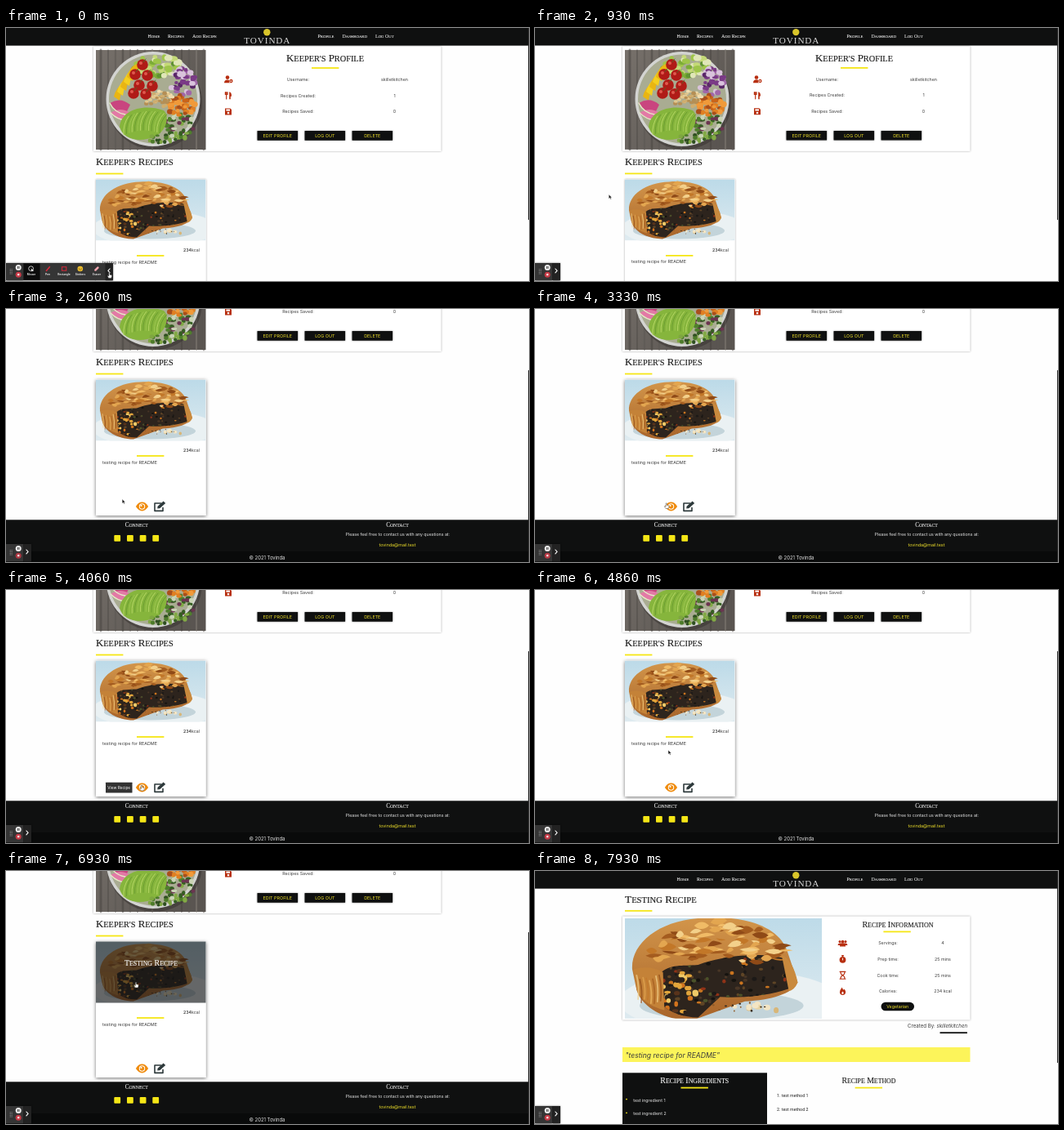
An HTML page for the animation above (8 s loop, 640 by 310 pixels).

```html
<!DOCTYPE html>
<html lang="en">
<head>
<meta charset="utf-8">
<title>Recipe profile</title>
<style>
html, body { margin: 0; width: 100%; height: 100%; overflow: hidden; background: #fefefe; }
svg { display: block; width: 640px; height: 310px; }
text { font-family: Inter, "Open Sans", sans-serif; fill: #3c3c3c; }
.cap { font-family: "Liberation Serif", "Noto Serif", serif; stroke-width: .012em; }
.card { fill: #fff; filter: drop-shadow(0 .7px .8px rgba(0,0,0,.36)); }
.btn { filter: drop-shadow(0 .6px .8px rgba(0,0,0,.4)); }
</style>
</head>
<body>
<svg id="stage" viewBox="0 0 640 310"></svg>
<script>
const INK = '#0f1010', YELLOW = '#f5e616', RUST = '#b72f10';
const USER = 'skilletkitchen', OWNER = "Keeper's", BRAND = 'Tovinda';

// ---- drawing helpers ----
const rect = (x, y, w, h, fill, more = '') =>
  `<rect x="${x}" y="${y}" width="${w}" height="${h}" fill="${fill}" ${more}/>`;
const oval = (x, y, rx, ry, fill, more = '') =>
  `<ellipse cx="${x}" cy="${y}" rx="${rx}" ry="${ry}" fill="${fill}" ${more}/>`;
const dot = (x, y, r, fill, more = '') => oval(x, y, r, r, fill, more);
const path = (d, fill, more = '') => `<path d="${d}" fill="${fill}" ${more}/>`;
const line = (d, color, w, more = '') =>
  path(d, 'none', `stroke="${color}" stroke-width="${w}" stroke-linecap="round" stroke-linejoin="round" ${more}`);
const group = (body, more = '') => `<g ${more}>${body}</g>`;
const at = (x, y, body, scale = 1) => group(body, `transform="translate(${x} ${y}) scale(${scale})"`);
const text = (x, y, size, str, anchor = 'start', more = '') =>
  `<text x="${x}" y="${y}" font-size="${size}" text-anchor="${anchor}" ${more}>${str}</text>`;
const mid = (x, y, str, size = 5.35, more = '') => text(x, y, size, str, 'middle', more);
const fillOf = c => `style="fill:${c}"`;

function caps(x, y, size, str, color = '#1c1c1c', anchor = 'start') {
  const spans = str.split(' ').map(w =>
    `<tspan font-size="${size}">${w[0].toUpperCase()}</tspan>` +
    `<tspan font-size="${size * .8}">${w.slice(1).toUpperCase()}</tspan>`).join(' ');
  return `<text class="cap" x="${x}" y="${y}" font-size="${size}" text-anchor="${anchor}" style="fill:${color};stroke:${color}">${spans}</text>`;
}
const rule = (x, y, color = YELLOW) => rect(x, y + .1, 33.4, 1.8, color);

let seed = 7;
const rnd = () => (seed = (seed * 16807) % 2147483647) / 2147483647;
const pick = list => list[Math.floor(rnd() * list.length)];
function scatter(n, cx, cy, rx, ry, size, colors) {
  let out = '';
  for (let i = 0; i < n; i++) {
    const a = rnd() * 6.283, d = Math.sqrt(rnd());
    out += oval((cx + Math.cos(a) * d * rx).toFixed(1), (cy + Math.sin(a) * d * ry).toFixed(1),
      (size * (.7 + rnd() * .6)).toFixed(1), (size * (.6 + rnd() * .5)).toFixed(1), pick(colors));
  }
  return out;
}

// ---- pictures ----
function bowl() {
  let s = rect(110, 27, 134.5, 122, 'url(#board)');
  for (let x = 116; x < 244; x += 9)
    s += line(`M${x} 27V149`, pick(['#45413e', '#86807a', '#5a5551']), 1 + rnd() * 2, 'opacity=".5"');
  s += dot(182, 91, 58, '#2f2b29', 'opacity=".45"') + oval(180, 87, 57.5, 58, '#d3d4d1') + oval(180, 87, 54, 54.5, '#a9ac92');
  s += scatter(46, 186, 48, 30, 13, 4, ['#9fc54a', '#7bab37', '#c4d977', '#5f9132', '#e0e6b8']);
  s += scatter(44, 216, 66, 16, 17, 3.2, ['#7a3a86', '#a067a8', '#5a2768', '#d9c3dc']);
  s += scatter(44, 212, 121, 19, 16, 3, ['#4f7f2c', '#355f22', '#82aa45', '#6b3550', '#c9d3b4']);
  s += scatter(40, 214, 96, 18, 13, 3.4, ['#e07f22', '#c9641a', '#f09a3a', '#a94f1c']);
  s += scatter(48, 187, 87, 18, 11, 2.3, ['#e3c78d', '#cfad6e', '#f0dcae', '#b58f55']);
  for (let i = 0; i < 5; i++)
    s += path(`M${132 + i * 4} ${84 - i * 6}q3 -12 12 -16l4 4q-8 5 -9 17z`, i % 2 ? '#f4cf1f' : '#e9b512');
  s += path('M127 92Q140 84 152 94L146 106Q134 104 127 92Z', '#c9457f') + path('M128 104Q140 96 152 104L150 113Q138 114 128 104Z', '#e27aa6') +
    line('M127 92Q133 104 146 106M128 104Q138 114 150 113', '#e6ecc6', 1.3);
  for (const [x, y] of [[167, 45], [158, 57], [173, 58], [163, 70], [179, 71], [156, 80], [171, 81]])
    s += dot(x, y, 6.8, '#b01b17') + dot(x - 2, y - 2, 2, '#e0584d') + line(`M${x + 1} ${y - 3}l3 -4`, '#47702a', .8);
  s += path('M139 121C141 101 167 92 193 101C201 108 196 127 182 133C164 141 143 137 139 121Z', '#86b53c');
  for (let i = 0; i < 14; i++)
    s += line(`M${144 + i * 3.4} ${131 - i * 1.6 + i * i * .11}q-1 -13 ${6 + i * .2} -23`, ['#b6d765', '#6a9c30', '#9cc650'][i % 3], 1);
  return s + scatter(16, 190, 136, 16, 5, 2.4, ['#4d7b2a', '#7ea640', '#2f4f20']);
}

const FILLING = 'M25 40C32 34 42 36 50 35C72 27 98 27 110 31L115 50C102 56 80 58 65 57L50 71C40 71 31 68 25 62Z';
function pie() {
  let s = rect(0, 0, 134.5, 75, 'url(#sky)') + oval(72, 60, 76, 22, '#eaf1f3') + oval(66, 63, 56, 10, '#b4c8d0', 'opacity=".7"');
  s += path('M5 38C4 20 24 4 54 3C84 1 106 10 111 26L118 47C114 55 100 59 82 60L46 73C26 73 11 63 8 52Z', 'url(#crust)');
  s += path(FILLING, '#2d241d');
  s += group(scatter(110, 68, 47, 46, 20, 1.3, ['#15130f', '#493626', '#c9741f', '#8f3217', '#5f4526', '#4b522a', '#1c1917']) +
    scatter(34, 38, 54, 13, 16, 1.9, ['#e2a53b', '#d2731d', '#59331b', '#efc968', '#2b211a']), 'clip-path="url(#fill)"');
  s += path('M6 38Q17 35 26 40L27 66Q12 62 8 52Z', '#c48238');
  const tones = ['#f3d08a', '#8f4a17', '#e3a650', '#c27728', '#f0bb66', '#a45c1f'];
  for (let i = 0; i < 80; i++) {
    const a = 3.2 + rnd() * 3, d = .15 + Math.sqrt(rnd()) * .8;
    const x = 58 + Math.cos(a) * d * 51, y = 34 + Math.sin(a) * d * 30;
    const w = 5 + rnd() * 9, h = 1 + rnd() * 4, up = (rnd() - .6) * 8;
    s += path(`M${x.toFixed(1)} ${y.toFixed(1)}q${(w / 2).toFixed(1)} ${(up - h).toFixed(1)} ${w.toFixed(1)} ${(up / 2).toFixed(1)}q${(-w / 2).toFixed(1)} ${h.toFixed(1)} ${(-w).toFixed(1)} ${(-up / 2).toFixed(1)}z`, tones[i % 6]);
  }
  for (let i = 0; i < 8; i++) s += line(`M${8 + i * 2.2} ${42 + rnd() * 4}q2 8 1 ${14 + rnd() * 4}`, tones[i % 6], 1, 'opacity=".7"');
  s += path('M107 28Q115 32 118 47Q116 52 112 53Z', '#c98a3e');
  return s + scatter(9, 88, 66, 16, 4, 2, ['#e9d3a2', '#d8b678', '#f3e5c4']) + scatter(12, 78, 64, 20, 4, .7, ['#8e5a28', '#33281d']);
}

// ---- icons, centred on 0,0 ----
const person = dot(-1, -2.4, 2.3, RUST) + path('M-5 4.3Q-5 .4 -1 .4T3 4.3Z', RUST);
const userCog = person + dot(3.4, 2, 2.5, '#fff') + dot(3.4, 2, 1.5, 'none', `stroke="${RUST}" stroke-width="1.3"`);
const utensils = line('M-2.3 -4V4.2M-3.6 -4V-1.2H-1V-4', RUST, 1.2) + path('M1.2 4.6V-4.4Q4.2 -4 4 1H2.8V4.6Z', RUST);
const floppy = path('M-4 -4H2.4L4 -2.4V4H-4Z', RUST) + rect(-2.6, -2.9, 4.6, 2.1, '#fff') + dot(0, 1.7, 1.3, '#fff');
const people = dot(-3.5, -1.8, 1.5, RUST) + dot(3.5, -1.8, 1.5, RUST) + dot(0, -1.6, 2, RUST) +
  path('M-6 2.6Q-5.6 0 -3 .2L3 .2Q5.6 0 6 2.6Z', RUST) + path('M-3.6 4Q-3.4 .8 0 .8T3.6 4Z', RUST);
const watch = dot(0, .8, 3.9, RUST) + rect(-1.4, -5, 2.8, 1.4, RUST) + rect(-.6, -4, 1.2, 2, RUST) + rect(-.45, -1.4, .9, 2.8, '#fff');
const glass = line('M-3.4 -4.4H3.4M-3.4 4.4H3.4M-2.6 -4.4Q-2.6 -1.4 0 0Q2.6 1.4 2.6 4.4M2.6 -4.4Q2.6 -1.4 0 0Q-2.6 1.4 -2.6 4.4', RUST, 1.1);
const flame = path('M-.8 -5Q-.4 -3 1.2 -1.6L2 -3Q4 -.4 3.6 1.6Q3 4.6 0 4.6T-3.6 1.4Q-3.6 -1.6 -.8 -5Z', RUST) + path('M0 0Q2 2 .9 3.2Q0 3.9 -1 3.2Q-2 2 0 0Z', '#fff');
const eye = path('M-7.6 0Q-4.4 -5.4 0 -5.4T7.6 0Q4.4 5.4 0 5.4T-7.6 0Z', '#ef8b0c') +
  dot(0, 0, 3.7, '#fff') + dot(0, 0, 2.7, '#ef8b0c') + dot(-1, -1, 1.1, '#fff');
const edit = line('M1.5 -4H-6V5.4H4V1.6', '#2d393b', 1.6) + path('M-2.8 2.6L-2.4 -.2L4.6 -6.6L7.2 -4L.2 2.2Z', '#2d393b');

// ---- pages ----
const nav = rect(0, 0, 640, 21.6, INK) +
  [[173.5, 'Home'], [198, 'Recipes'], [228, 'Add Recipe'], [381.5, 'Profile'], [411.5, 'Dashboard'], [452, 'Log Out']]
    .map(([x, s]) => caps(x, 12.2, 5.95, s, '#f0f0f0')).join('') +
  dot(319.3, 5.2, 4.2, '#d9c52a') +
  `<text class="cap" x="319.8" y="19" font-size="11.2" letter-spacing=".9" text-anchor="middle" style="fill:#dcdcdc">${BRAND.toUpperCase()}</text>`;

const button = (x, s) => rect(x, 126, 49.6, 11.7, INK, 'class="btn" rx=".5"') + mid(x + 24.8, 133.8, s, 5.4, fillOf('#efe02a'));
const row = (ix, lx, vx, y, icon, label, value) => at(ix, y, icon) + mid(lx, y + 1.9, label) + mid(vx, y + 1.9, value);

const profile = nav +
  rect(107, 22.5, 425.5, 128.5, '#fff', 'class="card"') + bowl() +
  caps(390.5, 41, 12.9, OWNER + ' Profile', undefined, 'middle') + rule(374, 48) +
  row(272, 357.5, 475.5, 63, userCog, 'Username:', USER) +
  row(272, 357.5, 475.5, 82.7, utensils, 'Recipes Created:', '1') +
  row(272, 357.5, 475.5, 102.4, floppy, 'Recipes Saved:', '0') +
  button(307.5, 'EDIT PROFILE') + button(365.5, 'LOG OUT') + button(423.5, 'DELETE') +
  caps(110, 168, 12.9, OWNER + ' Recipes') + rule(110, 177.5) +
  rect(110, 185.5, 134.8, 166.5, '#fff', 'class="card" id="card"') +
  at(110, 185.5, '<use href="#pie" clip-path="url(#small)"/>') +
  group(rect(110, 185.5, 134.5, 75, '#141414', 'opacity=".62"') + caps(177.5, 214.8, 9.9, 'Testing Recipe', '#f7f7f7', 'middle'), 'id="veil"') +
  text(237, 274, 5.2, '<tspan font-weight="600">234</tspan>kcal', 'end') + rule(160, 278) +
  text(118, 288.6, 5.37, 'testing recipe for README') +
  at(166.5, 341, eye) + at(188, 341, edit) +
  group(rect(122, 334.8, 32.5, 12.6, '#333', 'rx=".5"') + mid(138.2, 342.9, 'View Recipe', 4.8, fillOf('#fff')), 'id="tip"') +
  rect(0, 357.3, 640, 52, INK) + rect(0, 396, 640, 14, '#090a0a') +
  caps(159.7, 366, 7.2, 'Connect', '#f4f4f4', 'middle') + caps(479, 366, 7.2, 'Contact', '#f4f4f4', 'middle') +
  [132.3, 148, 163.7, 179.3].map(x => rect(x, 376, 7.8, 7.8, YELLOW, 'rx="1"')).join('') +
  mid(479.3, 377.2, 'Please feel free to contact us with any questions at:', 5.24, fillOf('#e6e6e6')) +
  mid(479, 389.6, 'tovinda@mail.test', 5.35, fillOf('#efe02a')) +
  mid(319.5, 405.6, '© 2021 ' + BRAND, 5.9, fillOf('#e6e6e6'));

const item = (y, n) => dot(112, y - 3, .9, YELLOW) + text(120.3, y, 5.25, 'test ingredient ' + n, 'start', fillOf('#ececec'));
const step = (y, n) => text(296, y, 5.3, `${n}. test method ${n}`, 'start', 'style="font-family:Roboto,sans-serif;fill:#222"');
const recipe = nav +
  caps(110, 38.6, 13.3, 'Testing Recipe') + rule(110, 47.8) +
  rect(107, 55.5, 425.5, 127, '#fff', 'class="card"') +
  group(at(110, 52.2, '<use href="#pie"/>', 1.792), 'clip-path="url(#large)"') +
  caps(444, 69, 10, 'Recipe Information', undefined, 'middle') + rule(426.4, 73.4) +
  row(376.5, 432, 499, 88.4, people, 'Servings:', '4') +
  row(376.5, 432, 499, 108, watch, 'Prep time:', '25 mins') +
  row(376.5, 432, 499, 127.8, glass, 'Cook time:', '25 mins') +
  row(376.5, 432, 499, 147.4, flame, 'Calories:', '234 kcal') +
  rect(423.5, 160.7, 40.5, 10.6, INK, 'rx="5.3"') + mid(443.7, 167.8, 'Vegetarian', 5.3, fillOf('#efe02a')) +
  text(529, 192, 6.1, `Created By: <tspan font-style="italic">${USER}</tspan>`, 'end') + rule(495.5, 197.2, INK) +
  rect(107, 216, 425.5, 18, '#fcf45a') + text(110.5, 229, 8.65, '"testing recipe for README"', 'start', 'font-style="italic"') +
  rect(107, 247.3, 177, 63, INK) + caps(195.3, 260, 9.9, 'Recipe Ingredients', '#f7f7f7', 'middle') + rule(178.5, 264.6) +
  item(282.6, 1) + item(299.3, 2) +
  caps(408.4, 260, 9.8, 'Recipe Method', undefined, 'middle') + rule(391.6, 264.6) +
  step(276.8, 1) + step(294.4, 2);

// ---- recorder bar ----
const label = (x, s) => mid(x, 303.4, s, 3.2, 'font-weight="600" style="fill:#eee"');
const tools = rect(0, 288, 131, 21.2, '#353535') + rect(21, 288.4, 20.6, 20.4, '#0c0c0c') +
  dot(30.6, 294.8, 2.9, 'none', 'stroke="#eee" stroke-width=".8"') + path('M30.6 294.4l3.4 3.2l-2.6 .6z', '#fff') +
  line('M49.4 297.4L53.4 292.8', '#d8283a', 1.6) +
  rect(68.4, 292.8, 5.4, 4.4, 'none', 'stroke="#d8283a" stroke-width="1"') +
  dot(90.8, 295, 3.3, '#f0bf2e') + line('M89.2 295.8q1.6 1.8 3.2 0', '#5d4208', .6) + dot(89.6, 294.2, .45, '#5d4208') + dot(92, 294.2, .45, '#5d4208') +
  line('M109.4 296.6L112.4 293.6', '#f0a5ae', 2.6) +
  label(31, 'Mouse') + label(51, 'Pen') + label(71, 'Rectangle') + label(91, 'Stickers') + label(111, 'Eraser');
let grip = rect(0, 288, 21.4, 21.2, '#353535', 'rx="1"');
for (let i = 0; i < 8; i++) grip += dot(5.2 + (i % 2) * 1.9, 295.7 + (i >> 1) * 1.8, .5, '#aaa');
grip += dot(15.2, 293.4, 3.5, '#f1f1f1') + rect(13.9, 291.9, .9, 3, '#333') + rect(15.6, 291.9, .9, 3, '#333') +
  dot(15.2, 302.2, 3.5, '#c93b48', 'id="rec"') + rect(14.1, 301.1, 2.2, 2.2, '#fff', 'rx=".4"');

const arrow = path('M0 0V5.2L1.3 4.1L2.2 6L3.1 5.6L2.2 3.8H3.8Z', '#111', 'stroke="#fff" stroke-width=".4"');
const hand = path('M-.6 0Q0 -.7 .6 0V2.2L3 2.8Q3.4 3.2 3 5L2.4 6.4H-.8L-2.4 3.8Q-2 3 -.6 4Z', '#fff', 'stroke="#222" stroke-width=".4"');

const grad = (id, a, b, x2 = 0, y2 = 1) =>
  `<linearGradient id="${id}" x1="0" y1="0" x2="${x2}" y2="${y2}"><stop stop-color="${a}"/><stop offset="1" stop-color="${b}"/></linearGradient>`;
const clip = (id, body) => `<clipPath id="${id}">${body}</clipPath>`;
const stage = document.getElementById('stage');
stage.innerHTML = '<defs>' +
  grad('board', '#77716b', '#5a5551', 1, .6) + grad('sky', '#bcdae8', '#dfebf0') + grad('crust', '#d2954a', '#a8642a') +
  clip('small', rect(0, 0, 134.5, 75, '#000')) + clip('large', rect(110, 58, 241, 122.7, '#000')) +
  clip('fill', path(FILLING, '#000')) +
  clip('barClip', rect(0, 285, 131, 25, '#000', 'id="barWidth"')) +
  group(pie(), 'id="pie"') + '</defs>' +
  rect(0, 0, 640, 310, '#fefefe') +
  group(profile, 'id="profile"') + group(recipe, 'id="recipe"') +
  rect(639, 0, 1, 235, '#2b2b2b', 'id="thumb"') +
  group(group(tools, 'clip-path="url(#barClip)"') + grip +
    group(rect(-9.6, 288, 9.6, 21.2, '#222', 'rx="1"') + line('M-3.9 295L-6.1 297.4L-3.9 299.8', '#fff', 1.1, 'id="chevron"'), 'id="toggle"'),
    'style="filter:drop-shadow(0 0 1px rgba(0,0,0,.5))"') +
  group(arrow, 'id="arrow"') + group(hand, 'id="hand"');

// ---- motion ----
const tracks = {
  bar: [[200, 131], [460, 31]],
  x: [[400, 126.4], [860, 90.3], [2130, 90.3], [2600, 142.2], [2800, 142.2], [3400, 166], [4530, 166], [5330, 159]],
  y: [[400, 300], [860, 204], [2130, 204], [2600, 233], [2800, 233], [3400, 239.5], [4530, 239.5], [5330, 136.5]],
  scroll: [[930, 0], [1130, 6], [1330, 30], [1530, 65], [1660, 80], [1860, 91], [2060, 99]],
  lift: [[2260, 0], [2530, 1]],
  tip: [[3330, 0], [3530, 1], [4460, 1], [4660, 0]],
  veil: [[5060, 0], [5400, 1]]
};
function value(name, t) {
  const k = tracks[name];
  if (t <= k[0][0]) return k[0][1];
  for (let i = 1; i < k.length; i++) if (t < k[i][0]) {
    const [t0, a] = k[i - 1], [t1, b] = k[i];
    return a + (b - a) * (t - t0) / (t1 - t0);
  }
  return k[k.length - 1][1];
}

// 15 ticks a second, with every third one skipped
const LOOP = 8000, TICK = LOOP / 120;
const skipped = n => n % 3 === (n < 14 ? 2 : n < 38 ? 0 : n < 53 ? 2 : n < 112 ? 0 : 1);
function held(ms) {
  let n = Math.floor((ms + 7) / TICK) % 120;
  while (skipped(n)) n--;
  return n * TICK;
}

const el = id => document.getElementById(id);
const show = (id, on) => { el(id).style.display = on ? '' : 'none'; };
const set = (id, name, v) => el(id).setAttribute(name, v);

function draw(ms) {
  const t = held(ms), opened = t > 7500, scroll = value('scroll', t), bar = value('bar', t);
  show('profile', !opened);
  show('recipe', opened);
  set('profile', 'transform', `translate(0 ${-scroll})`);
  set('thumb', 'y', opened ? 0 : scroll * .758);
  set('barWidth', 'width', bar);
  set('toggle', 'transform', `translate(${bar} 0)`);
  set('chevron', 'transform', bar < 80 ? 'translate(-10 0) scale(-1 1)' : '');
  set('rec', 'opacity', .9 + .1 * Math.cos(t / LOOP * 16 * Math.PI));
  set('tip', 'opacity', value('tip', t));
  set('veil', 'opacity', value('veil', t));
  const lift = value('lift', t);
  el('card').style.filter = `drop-shadow(0 ${.6 + lift}px ${.8 + 1.4 * lift}px rgba(0,0,0,${.36 + .19 * lift}))`;
  const overLink = t < 450 || (t > 3250 && t < 4650) || t > 5050;
  show('arrow', !opened && !overLink);
  show('hand', !opened && overLink);
  const place = `translate(${value('x', t)} ${value('y', t)})`;
  set('arrow', 'transform', place);
  set('hand', 'transform', place);
}

const start = performance.now();
function frame() {
  draw((performance.now() - start) % LOOP);
  requestAnimationFrame(frame);
}
frame();
</script>
</body>
</html>
```
